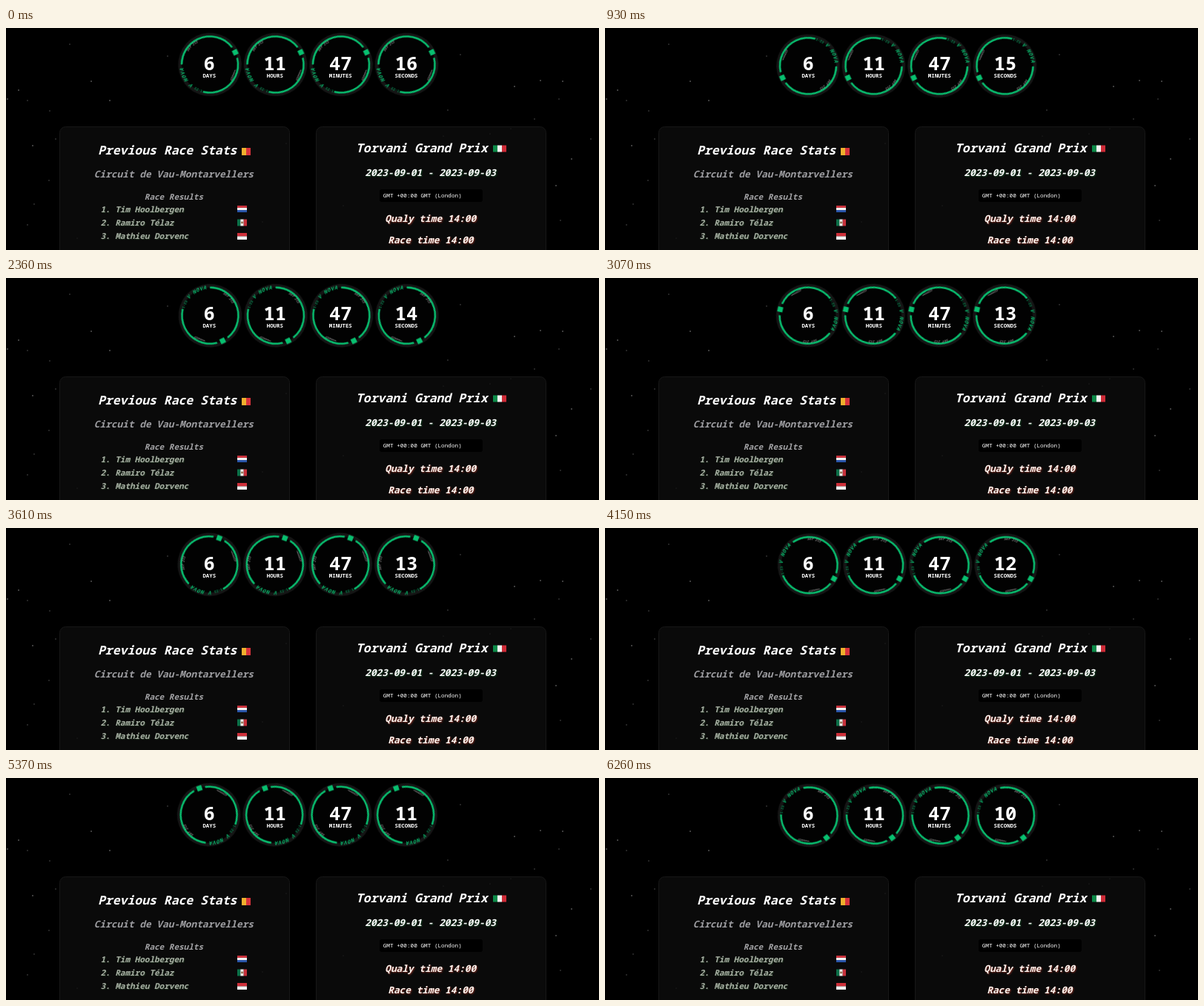
An HTML page that plays this animation: 800x300 px, repeating every 6310 ms.

```html
<!DOCTYPE html>
<html lang="en">
<head>
<meta charset="utf-8">
<title>Race countdown</title>
<style>
  html, body { margin: 0; width: 100%; height: 100%; overflow: hidden; background: #000; }
  svg { display: block; }
  text { font-family: "Noto Sans Mono", "DejaVu Sans Mono", monospace; font-weight: 700; fill: #fff; }

  .info text { font-style: italic; font-size: 12.82px; }
  .info .title { font-size: 16.45px; }
  .info .venue { fill: #9d9da1; }
  .info .list { font-size: 11px; fill: #a8b0a4; text-shadow: 1px 1px 1px #1c2c1c; }
  .info .head { font-size: 11px; fill: #a3a3a6; }
  .info .dates { text-shadow: 1px 1px 2px #12401f; }
  .info .time { fill: #fff4ee; text-shadow: 1px 1px 2px #7a2a20; }
  .info .zone { font-style: normal; font-size: 7.7px; font-weight: 500; }

  .panel { fill: #0a0a0a; stroke: #171717; }
  .stars { fill: none; stroke-linecap: round; }

  .num { font-size: 25.6px; font-weight: 600; text-anchor: middle; }
  .unit { font-size: 7.4px; text-anchor: middle; }
  .mark { font-size: 6.8px; font-style: italic; fill: #08c070; letter-spacing: .7px; }
  .code { font-size: 4.6px; fill: #0b9258; }
  .small { font-size: 4.6px; font-style: italic; fill: #858585; text-anchor: middle; }

  .tyre { transform-origin: 0 0; animation: spin 6310ms linear infinite; }
  @keyframes spin {
    0% { transform: rotate(64deg); }
    25.67% { transform: rotate(379deg); }
    100% { transform: rotate(1231deg); }
  }

  .strip { animation: count 6310ms step-end infinite; }
  @keyframes count {
    0% { transform: translateY(0); }
    12.5% { transform: translateY(-40px); }
    27.9% { transform: translateY(-80px); }
    43.3% { transform: translateY(-120px); }
    58.6% { transform: translateY(-160px); }
    74% { transform: translateY(-200px); }
    89.4%, 100% { transform: translateY(-240px); }
  }
</style>
</head>
<body>
<svg width="800" height="300" viewBox="0 0 800 300">
  <defs>
    <path id="rim" d="M0-36A36 36 0 0 1 0 36A36 36 0 0 1 0-36"/>
    <clipPath id="window"><rect x="515" y="32" width="50" height="28"/></clipPath>

    <!-- The wheel sits slightly off its axis, so it wobbles as it turns. -->
    <g id="tyre" transform="translate(-.6 -.9)">
      <circle r="40.4" fill="#020202" stroke="#151515" stroke-width="4.6"/>
      <circle r="38" fill="none" stroke="#08c070" stroke-width="2.5" pathLength="360"
              stroke-dasharray="0 12 118 76 142 12" transform="rotate(-90)"/>
      <rect x="-3.5" y="-41.5" width="7" height="7" fill="#08c070"/>
      <text class="code"><textPath href="#rim" startOffset="36.5%">1-23</textPath></text>
      <text class="mark"><textPath href="#rim" startOffset="42.7%">V NOVA</textPath></text>
      <text class="small" dy="2"><textPath href="#rim" startOffset="70%">sof 215</textPath></text>
      <path d="M-8-34L7-36M-8-34L6-34L7-36" transform="rotate(51)"
            fill="none" stroke="#777" stroke-width=".8"/>
    </g>
  </defs>

  <g class="stars">
    <path stroke="#999" stroke-width="1.5" d="M17 84h0M36 159h0M115 72h0M140 98h0M686 79h0M721 71h0M763 177h0M742 213h0M751 72h0M2 96h0"/>
    <path stroke="#666" stroke-width="1.3" d="M29 98h0M59 112h0M86 22h0M67 150h0M58 206h0M38 238h0M29 266h0M218 38h0M613 36h0M596 111h0M713 123h0M746 96h0M748 260h0M789 150h0"/>
  </g>

  <rect class="panel" x="72.5" y="133.5" width="310" height="190" rx="8"/>
  <rect class="panel" x="418.5" y="133.5" width="310" height="190" rx="8"/>
  <path class="stars" stroke="#333" stroke-width="1.2" d="M378 156h0M653 143h0M681 136h0M590 146h0M346 262h0M96 284h0M455 240h0"/>

  <g class="info">
    <text class="title" x="124" y="171">Previous Race Stats</text>
    <text class="venue" x="118.8" y="202">Circuit de Vau-Montarvellers</text>
    <text class="head" x="186.8" y="231.7">Race Results</text>
    <text class="list" x="127.4" y="248.7">1. Tim Hoolbergen</text>
    <text class="list" x="127.4" y="267.1">2. Ramiro Télaz</text>
    <text class="list" x="127.4" y="285.4">3. Mathieu Dorvenc</text>

    <text class="title" x="472" y="167.5">Torvani Grand Prix</text>
    <text class="dates" x="484.2" y="199.8">2023-09-01 - 2023-09-03</text>
    <rect x="504" y="218" width="139" height="17" rx="3"/>
    <text class="zone" x="508.7" y="229.3">GMT +00:00 GMT (London)</text>
    <text class="time" x="511.2" y="261.6">Qualy time 14:00</text>
    <text class="time" x="515.2" y="291.4">Race time 14:00</text>
  </g>

  <g class="flags">
    <path fill="#efb02e" d="M318 162h6v10h-6z"/>
    <path fill="#d8323c" d="M324 162h6v10h-6z"/>

    <path fill="#0b8a48" d="M657 158.5h6v9h-6z"/>
    <path fill="#f2f2f2" d="M663 158.5h6v9h-6z"/>
    <path fill="#ce2b37" d="M669 158.5h6v9h-6z"/>

    <path fill="#c8323c" d="M312 240h13v3h-13z"/>
    <path fill="#f2f2f2" d="M312 243h13v3h-13z"/>
    <path fill="#2a55a8" d="M312 246h13v3h-13z"/>

    <path fill="#0b7048" d="M312 258.5h4.3v9h-4.3z"/>
    <path fill="#eee" d="M316.3 258.5h4.4v9h-4.4z"/>
    <path fill="#c8323c" d="M320.7 258.5h4.3v9h-4.3z"/>
    <circle cx="318.5" cy="263" r="1.4" fill="#8a6a42"/>

    <path fill="#d0303a" d="M312 277h13v4.5h-13z"/>
    <path fill="#f2f2f2" d="M312 281.5h13v4.5h-13z"/>
  </g>

  <g transform="translate(274.5 50.3)"><use class="tyre" href="#tyre"/></g>
  <g transform="translate(363 50.3)"><use class="tyre" href="#tyre"/></g>
  <g transform="translate(451.5 50.3)"><use class="tyre" href="#tyre"/></g>
  <g transform="translate(540 50.3)"><use class="tyre" href="#tyre"/></g>

  <text class="num" x="274.3" y="57.2">6</text>
  <text class="num" x="362.8" y="57.2">11</text>
  <text class="num" x="451.3" y="57.2">47</text>
  <g clip-path="url(#window)">
    <g class="strip">
      <text class="num" x="540" y="57.2">16</text>
      <text class="num" x="540" y="97.2">15</text>
      <text class="num" x="540" y="137.2">14</text>
      <text class="num" x="540" y="177.2">13</text>
      <text class="num" x="540" y="217.2">12</text>
      <text class="num" x="540" y="257.2">11</text>
      <text class="num" x="540" y="297.2">10</text>
    </g>
  </g>
  <text class="unit" x="274.3" y="66.6">DAYS</text>
  <text class="unit" x="362.8" y="66.6">HOURS</text>
  <text class="unit" x="451.3" y="66.6">MINUTES</text>
  <text class="unit" x="540" y="66.6">SECONDS</text>
</svg>
</body>
</html>
```
